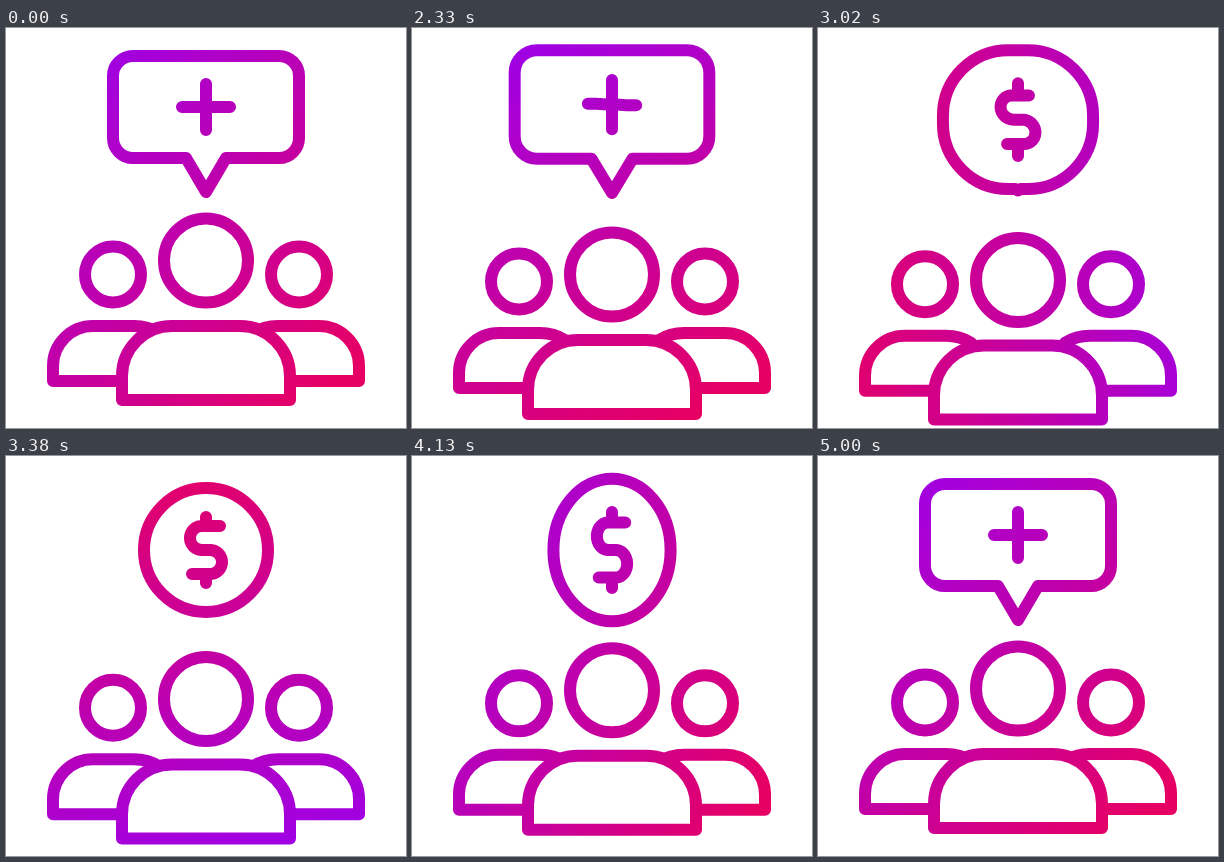
An HTML page with a canvas that plays this animation: 400 by 400 pixels, repeating every 5.03 s.

```html
<!DOCTYPE html>
<html lang="en">
<head>
<meta charset="utf-8">
<title>Group message</title>
<style>
  html, body { margin: 0; width: 100%; height: 100%; overflow: hidden; background: #fff; }
  canvas { display: block; width: 100vmin; height: 100vmin; }
</style>
</head>
<body>
<canvas id="stage" width="400" height="400"></canvas>
<script>
const ctx = document.getElementById('stage').getContext('2d');
const LOOP = 5030, START = 2030, FLIP = 3850, FLIP_END = 4850;
const TAU = Math.PI * 2;

const lerp = (a, b, p) => a + (b - a) * p;
const span = (t, a, b) => Math.min(1, Math.max(0, (t - a) / (b - a)));
const smooth = p => p * p * (3 - 2 * p);

// Easing curve with horizontal handles at x1 and x2
function ease(x, x1, x2) {
  let lo = 0, hi = 1;
  for (let i = 0; i < 24; i++) {
    const s = (lo + hi) / 2, r = 1 - s;
    if (3 * r * r * s * x1 + 3 * r * s * s * x2 + s * s * s < x) lo = s; else hi = s;
  }
  return smooth((lo + hi) / 2);
}

// Keys are [time, value] pairs, eased in between
function track(t, keys) {
  let value = keys[0][1];
  for (let i = 1; i < keys.length; i++)
    value = lerp(value, keys[i][1], smooth(span(t, keys[i - 1][0], keys[i][0])));
  return value;
}

const SCALE = [[2030, .988], [2550, 1.1], [2750, 1.074], [3080, 1.15], [3380, 1], [3830, 1.18], [4350, 1.13]];
const SHIFT = [[2030, 1], [2550, -4], [2750, -4], [3080, 0]];

function setGradient(t) {
  const a = Math.PI / 4 + TAU * smooth(span(t, START, 4430));
  const x = 200 * Math.cos(a), y = 200 * Math.sin(a);
  const g = ctx.createLinearGradient(200 - x, 200 - y, 200 + x, 200 + y);
  g.addColorStop(0, '#a000e4');
  g.addColorStop(1, '#e60064');
  ctx.strokeStyle = g;
}

function ring(x, y, r) {
  ctx.beginPath();
  ctx.arc(x, y, r, 0, TAU);
  ctx.stroke();
}

function sidePerson(dy, mirrored) {
  ctx.save();
  ctx.translate(mirrored ? 400 : 0, dy);
  if (mirrored) ctx.scale(-1, 1);
  const path = new Path2D('M116 353H47V338A40 40 0 0 1 87 298H128Q142 298 153 305');
  const placed = new Path2D();
  placed.addPath(path, ctx.getTransform());
  const head = new Path2D();
  head.arc(mirrored ? 293 : 107, 246.5 + dy, 28, 0, TAU);
  ctx.restore();
  ctx.stroke(placed);
  ctx.stroke(head);
}

function people(t) {
  const d = 20.5 * (ease(span(t, START, 2750), .33, .2) - ease(span(t, 2900, 4850), .167, .17));
  sidePerson(d / 2, false);
  sidePerson(d / 2, true);
  const body = new Path2D();
  body.addPath(new Path2D('M116 372V348A50 50 0 0 1 166 298H234A50 50 0 0 1 284 348V372Z'), { e: 0, f: d });
  ctx.fill(body);
  ctx.stroke(body);
  ring(200, 232.5 + d, 42);
}

// Rounded box with a tail (m = 0) turning into a circle (m = 1)
function frame(m) {
  const w = lerp(93, 62, m), h = lerp(51, 62, m), r = lerp(20, 62, m);
  const tail = 20 * (1 - m), tip = Math.max(h, lerp(85, 62, Math.min(1, m * 2)));
  ctx.moveTo(tail, h);
  ctx.arcTo(w, h, w, -h, r);
  ctx.arcTo(w, -h, -w, -h, r);
  ctx.arcTo(-w, -h, -w, h, r);
  ctx.arcTo(-w, h, 0, h, r);
  ctx.lineTo(-tail, h);
  if (m < 1) ctx.lineTo(0, tip);
  ctx.closePath();
}

// Point of the dollar curve, p from 0 (upper right) to 1 (lower left)
function curvePoint(p) {
  if (p > .5) {
    const [x, y] = curvePoint(1 - p);
    return [-x, -y];
  }
  const arc = 12 * Math.PI;
  let s = p * 2 * (14 + 4 + arc + 4);
  if (s < 18) return [14 - s, -24];
  s -= 18;
  if (s < arc) return [-4 - 12 * Math.sin(s / 12), -12 - 12 * Math.cos(s / 12)];
  return [-4 + s - arc, 0];
}

// Plus (m = 0) turning into a dollar sign (m = 1)
function sign(m) {
  const steps = 80;
  for (let i = 0; i <= steps; i++) {
    const p = i / steps, [x, y] = curvePoint(p);
    ctx.lineTo(lerp(-24 + 48 * p, x, m), lerp(0, y, m));
  }
  for (const side of [-1, 1]) {
    ctx.moveTo(0, side * lerp(23, 33, m));
    ctx.lineTo(0, side * 24 * m);
  }
}

function badge(t) {
  let m = 0, k = 1, dy = 0, sx = 1;
  const turn = smooth(span(t, FLIP, FLIP_END));
  if (t >= START && turn < .5) {
    m = lerp(.03, 1, ease(span(t, 2590, 3200), .6, .4));
    k = track(t, SCALE);
    dy = track(t, SHIFT);
  }
  sx = Math.max(.01, Math.abs(Math.cos(Math.PI * turn)));
  const y = 94 + (lerp(79, 94, m) - 94) * k + dy;
  for (const shape of [frame, sign]) {
    ctx.save();
    ctx.translate(200, y);
    ctx.scale(k * sx, k);
    ctx.beginPath();
    shape(m);
    ctx.restore();
    ctx.stroke();
  }
}

function draw(now) {
  const t = now % LOOP;
  ctx.fillStyle = '#fff';
  ctx.fillRect(0, 0, 400, 400);
  ctx.lineWidth = 12;
  ctx.lineCap = ctx.lineJoin = 'round';
  setGradient(t);
  people(t);
  badge(t);
  requestAnimationFrame(draw);
}
requestAnimationFrame(draw);
</script>
</body>
</html>
```
